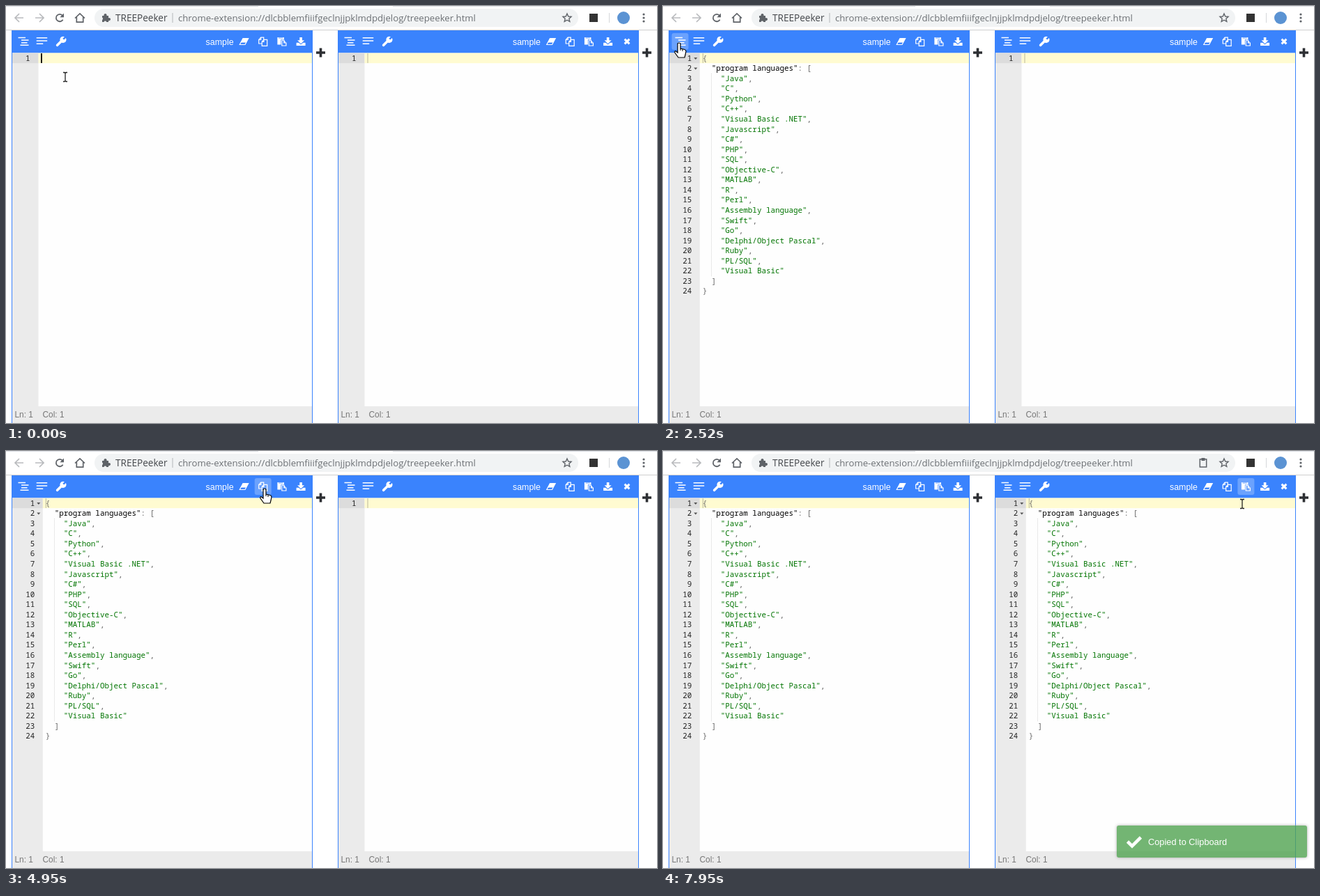
An HTML page for the animation above (8000 ms loop, 934x599 px).

```html
<!DOCTYPE html>
<html lang="en">
<head>
<meta charset="utf-8">
<title>TREEPeeker</title>
<style>
html, body { margin: 0; width: 100%; height: 100%; overflow: hidden; background: #fff; }
svg { display: block; width: 100%; height: 100%; }
text { white-space: pre; }
.ui { font-family: "Open Sans", "Noto Sans CJK SC", "Noto Sans CJK", sans-serif; }
.sans { font-family: "Liberation Sans", Arial, sans-serif; }
.code { font: 500 10.85px "Noto Sans Mono", monospace; font-variant-ligatures: none; }
</style>
</head>
<body>
<svg id="stage" viewBox="0 0 934 599"></svg>
<script>
const LOOP = 8000, ROW = 14.55, CHAR = 6.51, BLUE = '#3a83fd';
const MENU = [390, 1170], FORMAT = 2520, COPY = 4410, PASTE = 7530;

const STEPS = [0, 390, 520, 650, 780, 910, 1170, 1300, 1450, 1590, 1730, 1850, 1980, 2120,
  2520, 2670, 2790, 2930, 3060, 3190, 3330, 3460, 3600, 3740, 3870, 4010,
  4410, 4540, 4680, 4810, 4950, 5100, 5250, 5400, 5520, 5650, 5800, 5940, 6090, 6230,
  6760, 6880, 7250, 7390, 7530, 7670, 7810, 7950];

// Pointer path: time, x, y
const PATH = [[0, 85, 102], [390, 85, 102], [910, 141, 241], [1300, 141, 241], [1730, 45, 73],
  [2120, 23, 54], [2670, 23, 54], [3190, 310, 180], [3460, 369, 82], [4010, 371, 55],
  [4950, 371, 55], [5400, 672, 112], [5650, 823, 102], [5940, 838, 55], [6230, 846, 93],
  [6700, 846, 93], [6880, 880, 93], [7130, 880, 93], [7390, 838, 55], [7670, 838, 55], [7950, 831, 76]];

const data = { 'program languages': ['Java', 'C', 'Python', 'C++', 'Visual Basic .NET', 'Javascript',
  'C#', 'PHP', 'SQL', 'Objective-C', 'MATLAB', 'R', 'Perl', 'Assembly language', 'Swift', 'Go',
  'Delphi/Object Pascal', 'Ruby', 'PL/SQL', 'Visual Basic'] };
const raw = JSON.stringify(data);
const pretty = JSON.stringify(data, null, 2).split('\n');
const cuts = [0, ...['Basic .NET', ',"MATLAB', ',"Delphi'].map(s => raw.indexOf(s)), raw.length];

const rect = (x, y, w, h, fill, more = '') =>
  `<rect x="${x}" y="${y}" width="${w}" height="${h}" fill="${fill}" ${more}/>`;
const path = (d, fill, stroke = 'none', width = 1, more = '') =>
  `<path d="${d}" fill="${fill}" stroke="${stroke}" stroke-width="${width}" ${more}/>`;
const text = (s, x, y, size, fill, kind = 'sans', more = '') =>
  `<text class="${kind}" x="${x}" y="${y}" font-size="${size}" fill="${fill}" ${more}>${s}</text>`;
const move = (x, y, body) => `<g transform="translate(${x} ${y})">${body}</g>`;
const rowY = i => 78.7 + ROW * i;

function colours(s) {
  const list = Array(s.length).fill('#666');
  for (const m of s.matchAll(/"[^"]*"/g)) {
    const end = m.index + m[0].length;
    list.fill(s[end] === ':' ? '#000' : '#007400', m.index, end);
  }
  return list;
}

function codeLine(s, x, y, tint = colours(s)) {
  let out = '';
  for (let i = 0, j; i < s.length; i = j) {
    for (j = i + 1; j < s.length && tint[j] === tint[i];) j++;
    out += `<tspan fill="${tint[i]}">${s.slice(i, j)}</tspan>`;
  }
  return text(out, x, y, 10.85, '#777', 'code');
}

function browser(t) {
  const grey = '#5f6368', pale = '#b9bbbe';
  const arrow = 'M6 0H-6M0-6L-6 0L0 6';
  return rect(0, 0, 934, 35, '#fff') + rect(0, 0, 362, 1, '#dee1e6') + rect(555, 0, 379, 1, '#dee1e6') +
    rect(0, 34, 934, 1, '#cfcfcf') + rect(127, 4, 694, 26, '#f1f3f4', 'rx="13"') +
    move(19, 17, path(arrow, 'none', pale, 1.7)) +
    move(48, 17, path(arrow, 'none', pale, 1.7, 'transform="scale(-1 1)"')) +
    move(77, 17, path('M4.6 2.6A5.2 5.2 0 1 1 3.7-3.7', 'none', grey, 1.8) + path('M6-6.5V-.8H.3z', grey)) +
    move(106, 17, path('M-7 .5L0-6L7 .5M-4.7-1V6.2H4.7V-1', 'none', grey, 1.7)) +
    move(143, 17, path('M-5-3h2.6a2.1 2.1 0 1 1 3.8 0H4V.2a2.1 2.1 0 1 1 0 3.8V6H1.2a2 2 0 0 0-3.8 0H-5V3a2 2 0 0 0 0-3.5z', grey)) +
    text('TREEPeeker', 157, 22, 13.6, '#45484c', 'ui') + rect(238.5, 10, 1, 14, '#b4b7ba') +
    text('chrome-extension://dlcbblemfiiifgeclnjjpklmdpdjelog/treepeeker.html', 247, 22, 13.2, '#6c7074', 'ui') +
    (t >= PASTE ? move(775, 17, path('M-4.7-5.2H4.7V6H-4.7z', 'none', grey, 1.5) + rect(-2.5, -7, 5, 4, grey)) : '') +
    move(805, 17, path('M0-6L1.8-2L6-1.7L2.8 1.2L3.8 5.4L0 3.2L-3.8 5.4L-2.8 1.2L-6-1.7L-1.8-2z', 'none', grey, 1.4)) +
    rect(837, 11, 12, 12, '#333') + rect(865, 10, 1, 14, '#d5d7da') +
    '<circle cx="886" cy="17" r="9" fill="#5b93d3"/>' +
    [12, 17, 22].map(y => `<circle cx="915" cy="${y}" r="1.6" fill="${grey}"/>`).join('');
}

const ICONS = {
  indent: path('M-7-5.5H3.5M-2.5-2H8M-2.5 1.7H6M-4 5.3H8', 'none', '#fff', 1.5),
  left: path('M-8-5.2H7.5M-8-1H7.5M-8 3.2H1.5', 'none', '#fff', 1.6),
  wrench: path('M-5.3 5.3L2-2', 'none', '#fff', 3.6, 'stroke-linecap="round"') +
    path('M5-6.8L2.5-4.2L4.2-2.5L7-5A4.6 4.6 0 1 1 5-6.8z', '#fff'),
  eraser: path('M-1.5-4.5H6.2L1.5 4.5H-6.2z', 'none', '#fff', 1.2) + path('M-1.5-4.5H6.2L3 1.5H-4.6z', '#fff'),
  copy: path('M-1.5 3H-6V-2.5L-3-5.8H1V-3M-3-5.5V-2.5H-6M1.2-2.7H6V6.3H-1.5V.3zM1.2-2.7V.3H-1.5', 'none', '#fff', 1.2),
  paste: path('M-6.5-6H3V-3H-1.5V4.5H-6.5z', '#fff') + path('M-5-5H1.5', 'none', BLUE, .8) +
    path('M-.1-1.8H3V2H6V6H-.1z', 'none', '#fff', 1.2) + path('M3-1.8L6 1.5H3z', '#fff'),
  download: path('M-1.8-6H1.8V-1.7H5L0 3.2L-5-1.7H-1.8z', '#fff') + path('M-6.5 1.8H-3L0 4.6L3 1.8H6.5V6H-6.5z', '#fff'),
  close: path('M-3.4-3.4L3.4 3.4M3.4-3.4L-3.4 3.4', 'none', '#fff', 3)
};

// Buttons with their centres on the stage
const buttons = [];
[0, 468].forEach(x => {
  ['indent', 'left', 'wrench'].forEach((name, i) => buttons.push({ name, x: x + 24.5 + 27.2 * i }));
  ['eraser', 'copy', 'paste', 'download'].forEach((name, i) =>
    buttons.push({ name, x: (x ? 440.5 : 0) + 341.5 + 27.2 * i }));
});
buttons.push({ name: 'close', x: 891 });

const under = p => p.y >= 39 && p.y <= 63 ? buttons.findIndex(b => Math.abs(b.x - p.x) <= 12) : -1;

function toolbar(t, p) {
  const focus = t < FORMAT ? -1 : t < COPY ? 0 : t < 7390 ? 4 : 12;
  const hover = under(p);
  return buttons.map((b, i) =>
    (i === focus || i === hover ? rect(b.x - 12, 39, 24, 24, '#fff', 'rx="3" opacity=".25"') : '') +
    move(b.x, 51, ICONS[b.name])).join('') +
    text('sample', 286.6, 55.5, 12.4, '#fff') + text('sample', 727, 55.5, 12.4, '#fff');
}

// mode: 0 empty, 1 one long wrapped line, 2 indented
function panel(x, mode, focused, caretOn) {
  const gutter = mode === 2 ? 52.8 : 46.5;
  const origin = gutter + 4, last = mode === 1 ? 3 : 0;
  const top = 67.6 + ROW * last;
  let out = rect(8, 35, 432, 564, BLUE) + rect(9, 67.5, 430, 508, '#fefefe') +
    rect(9, 67.5, gutter - 9, 508, '#ebebeb') + rect(9, 67.6, gutter - 9, ROW * (last + 1), '#dcdcdc') +
    rect(gutter, top, 439 - gutter, ROW, '#fffbd1') + rect(9, 575, 430, 24, '#ebebeb');
  const count = mode === 2 ? pretty.length : 1;
  for (let i = 0; i < count; i++)
    out += text(i + 1, mode === 2 ? 41.3 : 34.5, rowY(i), 10.85, '#222', 'code', 'text-anchor="end"');
  if (mode === 1) {
    const tint = colours(raw);
    for (let i = 0; i < 4; i++)
      out += codeLine(raw.slice(cuts[i], cuts[i + 1]), origin + (i && 2 * CHAR), rowY(i), tint.slice(cuts[i], cuts[i + 1]));
    out += rect(50.5, 68.5, 6, 13, 'none', 'stroke="#d0d0d0"');
  }
  if (mode === 2) {
    out += pretty.map((s, i) => codeLine(s, origin, rowY(i))).join('') +
      path(`M69.5 97V${97 + 20 * ROW}`, 'none', '#d4d4d4', 1, 'stroke-dasharray="1 1"') +
      [0, 1].map(i => path(`M44.3 ${74 + i * ROW}h5l-2.5 3z`, '#555')).join('');
  }
  const caretX = mode === 1 ? origin + CHAR * (2 + cuts[4] - cuts[3]) : origin;
  if (focused) out += caretOn ? rect(caretX - .5, top + .4, 1.8, ROW - .6, '#000') : '';
  else out += rect(caretX, top + .4, 1, ROW - .6, '#b9b79c');
  out += text('Ln: 1', 12.5, 591, 11.9, '#777') + text('Col: ' + (mode === 1 ? raw.length + 1 : 1), 52.5, 591, 11.9, '#777') +
    path('M451.5 60.5V73.5M445 67H458', 'none', '#2d2f33', 3.6);
  return move(x, 0, out);
}

const ITEMS = [[116, '表情符号', 'Win 键+期间'], [148, '撤消(U)', 'Ctrl+Z', 1], [170, '重做(R)', 'Ctrl+Shift+Z', 1],
  [202, '剪切(T)', 'Ctrl+X', 1], [224, '复制(C)', 'Ctrl+C', 1], [245.5, '粘贴(P)', 'Ctrl+V'],
  [267.5, '粘贴为纯文本', 'Ctrl+Shift+V'], [289.5, '全选(A)', 'Ctrl+A'],
  [321, '拼写检查(S)', ''], [343, '书写方向', ''], [375, '检查(N)', 'Ctrl+Shift+I']];

function menu(p) {
  return rect(88, 106, 189, 285, '#000', 'opacity=".2"') + rect(87, 105, 189, 285, '#000', 'opacity=".3"') +
    rect(83.5, 101.5, 191, 287, '#fff', 'stroke="#a8a8a8"') +
    [131, 185, 304, 358].map(y => rect(84, y, 190, 1, '#e6e6e6')).join('') +
    ITEMS.map(([y, label, keys, off]) => {
      const ink = off ? '#919191' : '#000';
      return (!off && Math.abs(p.y - y) < 11 ? rect(84, y - 11, 190, 22, '#e9e9e9') : '') +
        text(label, 113, y + 4.2, 11, ink, 'ui') +
        (keys ? text(keys, 253, y + 4.2, 11.7, ink, 'ui', 'text-anchor="end"') : path(`M263 ${y - 3.5}v7l4-3.5z`, '#333'));
    }).join('');
}

function toast(t) {
  const shade = Math.min(1, Math.max(0, (t - 4950) / 450));
  return shade ? `<g opacity="${shade}">` +
    rect(651, 538, 273, 46, '#51a351', 'rx="3" opacity=".8" style="filter:drop-shadow(0 0 2px #999)"') +
    path('M666.5 561L673 567.5L685.5 555', 'none', '#fff', 4.6) +
    text('Copied to Clipboard', 696, 565.5, 12.8, '#fff') + '</g>' : '';
}

const SHAPES = {
  arrow: path('M0 0v15l3.5-3.4 2.5 5.6 2.4-1.1-2.5-5.4h4.8z', '#fff', '#000'),
  hand: path('M-2 1q0-2 2-2t2 2v6l6 1.5q2 .6 2 2.5l-1 5q-.5 2-1 4h-9l-5-7q-.8-2 1-2.4l3 2.4z', '#fff', '#000', 1.2) +
    path('M2 7v3M5 8v3', 'none', '#000'),
  beam: path('M-3-6.5H-1L0-5.5L1-6.5H3M0-5.5V5.5M-3 6.5H-1L0 5.5L1 6.5H3', 'none', '#222', 1.3)
};

function pointer(t, p, open) {
  const inner = p.x % 468;
  const overText = p.y > 67.5 && p.y < 575 && inner > 46.5 && inner < 439;
  const shape = under(p) >= 0 ? 'hand' : overText && !open ? 'beam' : 'arrow';
  return move(p.x, p.y, SHAPES[shape]);
}

function pointerAt(t) {
  const i = PATH.findIndex(k => k[0] > t);
  if (i < 0) return { x: PATH.at(-1)[1], y: PATH.at(-1)[2] };
  const [a, b] = [PATH[i - 1], PATH[i]];
  const f = (t - a[0]) / (b[0] - a[0]);
  return { x: a[1] + (b[1] - a[1]) * f, y: a[2] + (b[2] - a[2]) * f };
}

function draw(t) {
  const p = pointerAt(t), open = t >= MENU[0] && t < MENU[1];
  const mode = t < MENU[1] ? 0 : t < FORMAT ? 1 : 2;
  const caretOn = t < 1980 || t >= 2120;
  return browser(t) + panel(0, mode, t < FORMAT, caretOn) + panel(468, t < PASTE ? 0 : 2, false, false) +
    toolbar(t, p) + (open ? menu(p) : '') + toast(t) + pointer(t, p, open);
}

const stage = document.getElementById('stage');
let shown = -1;
function tick() {
  const now = performance.now() % LOOP;
  const step = STEPS.findLast(s => s <= now);
  if (step !== shown) stage.innerHTML = draw(shown = step);
  requestAnimationFrame(tick);
}
tick();
</script>
</body>
</html>
```
